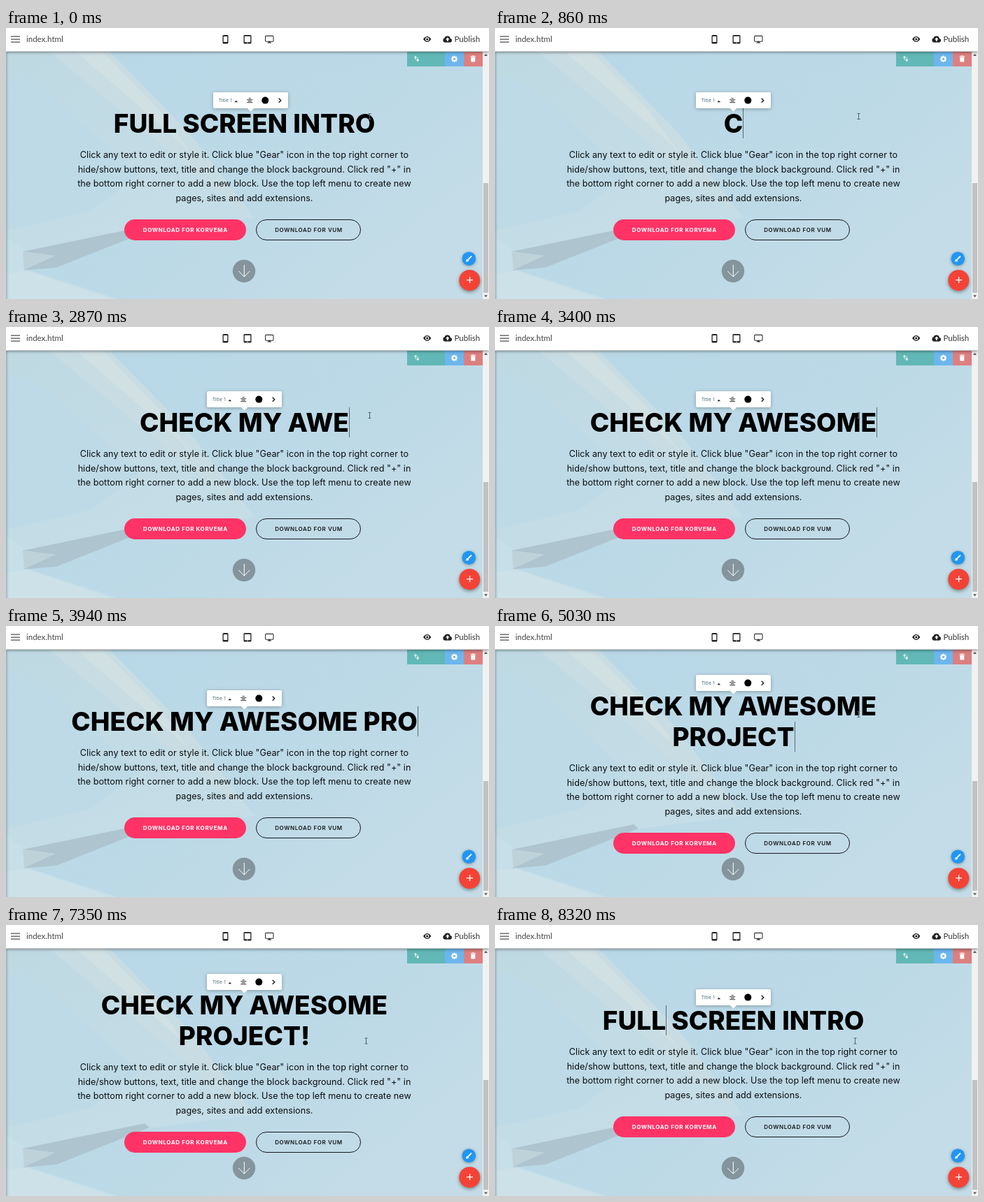
An HTML page with a canvas that plays this animation: 690x388 px, repeating every 8370 ms.

```html
<!DOCTYPE html>
<html lang="en">
<head>
<meta charset="utf-8">
<title>Page builder</title>
<style>
html, body { margin: 0; width: 100%; height: 100%; overflow: hidden; background: #bcd9e6; }
canvas { display: block; width: 690px; height: 388px; }
</style>
</head>
<body>
<canvas id="stage" width="690" height="388"></canvas>
<script>
const ctx = document.getElementById('stage').getContext('2d');
const LOOP = 8370, BLINK = 530, MID = 340.5;
const OLD = 'FULL SCREEN INTRO', NEW = 'CHECK MY AWESOME PROJECT!';
const BODY = [
  'Click any text to edit or style it. Click blue "Gear" icon in the top right corner to',
  'hide/show buttons, text, title and change the block background. Click red "+" in',
  'the bottom right corner to add a new block. Use the top left menu to create new',
  'pages, sites and add extensions.'
];
// moment at which each letter of NEW is typed
const KEYS = [860, 1270, 1450, 1640, 1890, 2140, 2200, 2310, 2550, 2640, 2750, 2870, 3050,
  3110, 3290, 3350, 3460, 3640, 3700, 3940, 4120, 4230, 4540, 4800, 5500];
const ERASE = [70, 160, 250, 340, 430, 530, 620];
const UNDO = 8320;

function poly(color, ...p) {
  ctx.fillStyle = color;
  ctx.beginPath();
  for (let i = 0; i < p.length; i += 2) ctx.lineTo(p[i], p[i + 1]);
  ctx.fill();
}
function line(color, width, ...p) {
  ctx.strokeStyle = color;
  ctx.lineWidth = width;
  ctx.beginPath();
  for (let i = 0; i < p.length; i += 2) ctx.lineTo(p[i], p[i + 1]);
  ctx.stroke();
}
function rect(color, x, y, w, h, r = 0) {
  ctx.fillStyle = color;
  ctx.beginPath();
  ctx.roundRect(x, y, w, h, r);
  ctx.fill();
}
function frame(color, width, x, y, w, h, r) {
  ctx.strokeStyle = color;
  ctx.lineWidth = width;
  ctx.beginPath();
  ctx.roundRect(x, y, w, h, r);
  ctx.stroke();
}
function disc(color, x, y, r) {
  ctx.fillStyle = color;
  ctx.beginPath();
  ctx.arc(x, y, r, 0, 7);
  ctx.fill();
}
function font(f, spacing = 0) {
  ctx.font = f;
  ctx.letterSpacing = spacing + 'px';
}
function text(s, x, y, color, align = 'left') {
  ctx.fillStyle = color;
  ctx.textAlign = align;
  ctx.fillText(s, x, y);
}
function shadowed(blur, dy, alpha, draw) {
  ctx.save();
  ctx.shadowColor = `rgba(0,0,0,${alpha})`;
  ctx.shadowBlur = blur;
  ctx.shadowOffsetY = dy;
  draw();
  ctx.restore();
}
function fade(x0, y0, x1, y1, ...colors) {
  const g = ctx.createLinearGradient(x0, y0, x1, y1);
  colors.forEach((c, i) => g.addColorStop(i / (colors.length - 1), c));
  return g;
}

function backdrop() {
  rect(fade(200, 34, 480, 388, '#b9d8e7', '#bcd9e7', '#c3dce7'), 0, 34, 690, 354);
  poly(fade(0, 34, 130, 330, '#bfd9e3', '#c4dde6'), 0, 34, 88, 34, 356, 272, 210, 290, 0, 345);
  poly('#c8dde3', 62, 34, 148, 34, 262, 150, 352, 268, 300, 232);
  poly('#d0e0e3', 100, 34, 138, 34, 218, 116, 262, 176, 190, 112);
  poly('#bddae6', 0, 62, 60, 92, 190, 210, 120, 262, 0, 290);
  poly('#c6dfe8', 0, 300, 26, 318, 30, 346, 160, 388, 0, 388);
  poly('#aec5cf', 24, 320, 198, 284, 205, 290, 72, 343, 24, 347, 70, 326);
  poly('#bed2d9', 24, 320, 70, 326, 26, 346);
  poly('#cde1e8', 0, 352, 28, 347, 150, 388, 0, 388);
  rect(fade(0, 0, 4, 0, 'rgba(80,100,110,.35)', 'rgba(80,100,110,0)'), 0, 34, 4, 354);
}

function navbar() {
  shadowed(4, 1, .4, () => rect('#fff', 0, 0, 690, 33.5));
  for (const y of [12, 16, 20]) rect('#555', 7, y - .5, 13, 1.3);
  font('400 11.5px Lato, sans-serif');
  text('index.html', 29, 20, '#444');
  text('Publish', 640.5, 20, '#333');
  rect('#222', 309.5, 10, 8, 12.5, 1.5);
  rect('#fff', 310.8, 12, 5.4, 8);
  rect('#222', 339.5, 10, 11, 12.5, 1.5);
  rect('#fff', 340.8, 11.8, 8.4, 8.4);
  disc('#fff', 345, 21.3, .7);
  frame('#333', 1.1, 370.6, 11.4, 11.4, 7.8, 1);
  rect('#333', 374.8, 19, 3, 2);
  rect('#333', 373.5, 20.6, 5.6, 1);
  ctx.fillStyle = '#222';
  ctx.beginPath();
  ctx.moveTo(596, 16);
  ctx.quadraticCurveTo(601.7, 8, 607.4, 16);
  ctx.quadraticCurveTo(601.7, 24, 596, 16);
  ctx.fill();
  disc('#fff', 601.7, 16, 2.7);
  disc('#222', 601.7, 16, 1.6);
  disc('#222', 627.6, 17.4, 3.2);
  disc('#222', 630.6, 15.6, 4.1);
  disc('#222', 634.2, 17.8, 2.8);
  rect('#222', 627.6, 17, 6.6, 3.6);
  poly('#fff', 630.8, 13.6, 633.6, 16.6, 631.8, 16.6, 631.8, 18.8, 629.8, 18.8, 629.8, 16.6, 628, 16.6);
}

function blockTools() {
  rect('#61b8b6', 573, 34, 54, 21);
  rect('#6cb6ee', 627, 34, 27, 21);
  rect('#dd7f80', 654, 34, 27, 21);
  line('#fff', 1, 585, 45.5, 585, 40.8);
  poly('#fff', 582.8, 42.6, 585, 40, 587.2, 42.6);
  line('#fff', 1, 588.2, 42.5, 588.2, 47.4);
  poly('#fff', 586, 45.6, 588.2, 48.2, 590.4, 45.6);
  for (let i = 0; i < 4; i++) {
    const a = i * Math.PI / 4, c = 4.6 * Math.cos(a), s = 4.6 * Math.sin(a);
    line('#fff', 1.9, 640.5 - c, 44.3 - s, 640.5 + c, 44.3 + s);
  }
  disc('#fff', 640.5, 44.3, 3.5);
  disc('#6cb6ee', 640.5, 44.3, 1.6);
  rect('#fff', 664.3, 41.8, 6, 6.8, .8);
  rect('#fff', 663.6, 40.2, 7.4, 1.1);
  rect('#fff', 665.8, 39.5, 3, 1);
}

function scrollbar() {
  rect('#f1f1f1', 681, 34, 9, 354);
  rect('#c1c1c1', 682, 222, 7, 157);
  poly('#555', 683, 40, 685.5, 37, 688, 40);
  poly('#555', 683, 382.5, 685.5, 385.5, 688, 382.5);
}

function floating() {
  disc('rgba(110,122,130,.72)', 340, 348, 16.2);
  line('#fff', 1, 340.3, 339, 340.3, 356);
  line('#fff', 1, 332.3, 348, 340.3, 356.2, 348.3, 348);
  shadowed(4, 1, .35, () => disc('#2196f3', 661.3, 330.3, 9.8));
  line('#fff', 1.8, 660.6, 331, 665, 326.6);
  disc('#fff', 659.3, 332.5, 1.8);
  poly('#fff', 656.8, 334.4, 659, 331, 660.5, 334.2);
  shadowed(5, 2, .4, () => disc('#f44336', 662.3, 361.2, 15));
  rect('#fff', 658, 360.2, 9, 1.3);
  rect('#fff', 661.9, 356.3, 1.3, 9);
}

function toolbar(x, y) {
  shadowed(5, 1, .3, () => rect('#fff', x - 53.5, y, 107, 23, 2));
  poly('#fff', x - 5, y + 22.8, x + 5, y + 22.8, x, y + 27.5);
  font('400 7px "Open Sans", sans-serif');
  text('Title 1', x - 45.5, y + 14.3, '#3a6470');
  poly('#222', x - 23, y + 14.2, x - 20.7, y + 11.8, x - 18.4, y + 14.2);
  [[9, 3], [11, 8], [13, 5], [15, 8]].forEach(([dy, w]) =>
    rect('#333', x - 1.3 - w / 2, y + dy - .8, w, 1));
  disc('#000', x + 20.8, y + 11.6, 5);
  line('#222', 1.5, x + 40.2, y + 8.7, x + 43.2, y + 11.7, x + 40.2, y + 14.7);
}

function copy(dy) {
  font('400 12.6px Inter, sans-serif', .04);
  BODY.forEach((s, i) => text(s, MID, 186 + dy + i * 20.5, '#0a0e10', 'center'));
  rect('#ff3366', 169, 274 + dy, 174, 30, 15);
  frame('#15191c', 1, 357.5, 274.5 + dy, 149, 29, 14.5);
  font('700 8px Inter, sans-serif', .6);
  text('DOWNLOAD FOR KORVEMA', 256.3, 291.8 + dy, '#fff', 'center');
  font('600 8px Inter, sans-serif', .6);
  text('DOWNLOAD FOR VUM', 432.5, 291.8 + dy, '#15191c', 'center');
}

function titleAt(t) {
  if (t >= UNDO) return { s: OLD, caret: 4, since: UNDO };
  const typed = KEYS.filter(k => k <= t).length;
  if (typed) return { s: NEW.slice(0, typed), caret: typed, since: KEYS[typed - 1] };
  const n = ERASE.filter(k => k <= t).length;
  const s = OLD.slice(0, Math.round(OLD.length * (1 - n / ERASE.length)));
  return { s, caret: n ? s.length : -1, since: n ? ERASE[n - 1] : 0 };
}

function title(t, { s, caret, since }, wrap) {
  font('800 37px Inter, sans-serif', 0);
  const cut = wrap ? NEW.indexOf('PROJECT') : 0;
  const lines = wrap ? [s.slice(0, cut - 1), s.slice(cut)] : [s];
  const base = wrap ? 128 : 150;
  lines.forEach((l, i) => text(l, MID, base + i * 44, '#000', 'center'));
  if (caret < 0 || (t - since) % (2 * BLINK) >= BLINK) return;
  const last = lines[lines.length - 1];
  const x = MID - ctx.measureText(last).width / 2 + ctx.measureText(last.slice(0, caret - cut)).width;
  rect('#5d6a70', Math.round(x), base + (lines.length - 1) * 44 - 35, 1, 43);
}

function pointer(t) {
  const k = Math.min(1, Math.max(0, (t - 5930) / 400));
  const e = k * k * (3 - 2 * k);
  const x = 519.5 - 5 * e, y = 126.5 + 37 * e + (t > 6900 ? 2.5 : 0);
  line('#56646b', 1, x, y - 4, x, y + 4);
  for (const d of [-4, 4]) line('#56646b', 1, x - 2, y + d, x + 2, y + d);
}

function draw(now) {
  const t = now % LOOP;
  const state = titleAt(t);
  const wrap = state.s.length > 20;
  backdrop();
  blockTools();
  copy(wrap ? 22 : 0);
  title(t, state, wrap);
  toolbar(t < ERASE[0] ? 349.5 : 340.5, wrap ? 70 : 92);
  floating();
  scrollbar();
  navbar();
  pointer(t);
}

const start = performance.now();
function tick() {
  draw(performance.now() - start);
  requestAnimationFrame(tick);
}
tick();
</script>
</body>
</html>
```
